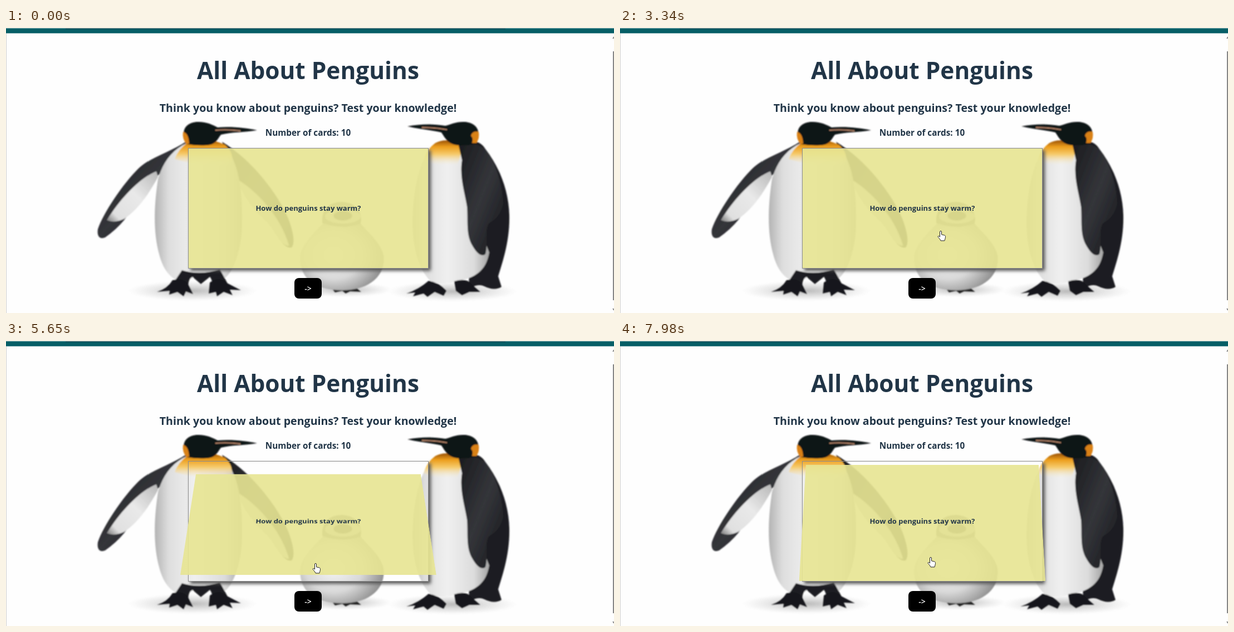
Animation, 1092 px wide and 513 px high, one loop 8000 ms. Source, as an HTML page:

```html
<!DOCTYPE html>
<html lang="en">
<head>
<meta charset="utf-8">
<title>Penguin cards</title>
<style>
  html, body { margin: 0; width: 100%; height: 100%; overflow: hidden; background: #fefefe; }
  body { position: relative; font: 700 13px/21px "Open Sans", "Noto Sans", sans-serif; color: #213547; }
  svg { position: absolute; left: 0; top: 0; overflow: visible; }
  text { fill: #213547; text-anchor: middle; }
  .card {
    position: absolute; left: 327px; top: 216px; width: 432px; height: 217px;
    box-sizing: border-box; border: 1px solid #8d8d8d;
    box-shadow: 4px 4px 6px #555; perspective: 900px;
  }
  .flip { position: absolute; inset: 0; transform-style: preserve-3d; }
  .face {
    position: absolute; inset: 0; display: flex; align-items: center; justify-content: center;
    text-align: center; white-space: nowrap; background: rgba(231, 229, 147, .91); backface-visibility: hidden;
  }
  .back { transform: rotateX(180deg); }
  .next {
    position: absolute; left: 518px; top: 450px; width: 49px; height: 37px; border-radius: 8px;
    background: #000; color: #fff; font-size: 14px; font-weight: 600; line-height: 38px; text-align: center;
  }
</style>
</head>
<body>
<svg width="1092" height="513" viewBox="0 0 1092 513">
  <defs>
    <linearGradient id="belly">
      <stop offset="0" stop-color="#b4b4b4"/><stop offset=".16" stop-color="#dedede"/>
      <stop offset=".45" stop-color="#f0f0f0"/><stop offset=".8" stop-color="#dcdcdc"/>
      <stop offset="1" stop-color="#a4a4a4"/>
    </linearGradient>
    <linearGradient id="bib" x2="0" y2="1">
      <stop offset="0" stop-color="#9a5205"/><stop offset=".25" stop-color="#ec9d1c"/>
      <stop offset=".55" stop-color="#f6cb6c"/><stop offset="1" stop-color="#f4f0e4" stop-opacity="0"/>
    </linearGradient>
    <linearGradient id="wing" x2="1" y2="1">
      <stop offset="0" stop-color="#1a1b1e"/><stop offset=".5" stop-color="#34353a"/>
      <stop offset="1" stop-color="#17181b"/>
    </linearGradient>
    <linearGradient id="under" x1="1" y1="0" x2="0" y2="1">
      <stop offset="0" stop-color="#b9b9b9"/><stop offset=".45" stop-color="#e9e9e9"/>
      <stop offset=".85" stop-color="#e0e0e0"/><stop offset="1" stop-color="#777"/>
    </linearGradient>
    <radialGradient id="chick" cx=".4" cy=".5" r=".62">
      <stop offset="0" stop-color="#f4f4f4"/><stop offset=".55" stop-color="#d9d9d9"/>
      <stop offset="1" stop-color="#8e8e8e"/>
    </radialGradient>
    <radialGradient id="ground">
      <stop offset="0" stop-color="#777" stop-opacity=".5"/><stop offset="1" stop-color="#999" stop-opacity="0"/>
    </radialGradient>
    <filter id="soft"><feGaussianBlur stdDeviation=".8"/></filter>
  </defs>

  <g filter="url(#soft)">
    <g fill="url(#ground)">
      <ellipse cx="335" cy="473" rx="115" ry="18"/>
      <ellipse cx="608" cy="471" rx="85" ry="13"/>
      <ellipse cx="802" cy="474" rx="115" ry="18"/>
    </g>

    <!-- left adult -->
    <path fill="url(#wing)" d="M388 205C430 230 474 278 500 328C514 355 521 386 513 395C500 398 489 377 477 358C455 326 425 300 410 262Z"/>
    <path fill="#cfcfcf" d="M414 272C445 290 492 335 508 392C491 390 484 366 469 350Q430 315 414 272Z"/>
    <path fill="url(#wing)" d="M324 204C298 222 262 232 241 250C210 279 174 335 165 362C163 374 168 381 178 377Q198 363 212 346L270 268L322 224Z"/>
    <path fill="url(#under)" d="M270 258C240 270 206 306 181 346Q196 352 213 343C240 324 258 296 273 268Z"/>
    <path fill="url(#belly)" d="M325 207C298 219 281 243 273 272C265 325 265 370 275 407C281 430 290 445 309 456Q330 457 342 445L363 445Q372 459 391 452C409 439 424 399 424 348C425 296 418 242 392 210Z"/>
    <path fill="url(#bib)" d="M325 207Q360 194 393 210Q411 226 404 247Q354 252 303 236Q309 219 325 207Z"/>
    <path fill="#111216" d="M326 209C314 191 317 172 342 169C359 168 371 174 380 179C407 177 431 180 451 184C429 188 405 187 386 192C379 201 377 210 360 211Q341 212 326 209Z"/>
    <path fill="#d98118" d="M318 187Q328 189 329 208L324 209Q316 199 318 187Z"/>
    <path fill="none" stroke="#b9876a" stroke-width="2" d="M376 184Q397 182 421 185"/>
    <path fill="#1b1c20" d="M316 436L300 460L328 468Q326 452 335 448L350 461L366 448Q372 454 370 467L398 460L384 434Q350 446 316 436Z"/>
    <path fill="#17181b" d="M299 454Q320 448 328 463L336 479L323 474L319 483L308 475L293 480L294 473L271 475Q290 469 299 454ZM366 458Q384 446 397 459L422 472L402 471L407 481L391 475L379 483L377 475L364 478Z"/>

    <!-- chick -->
    <path fill="#222" d="M583 466H627L638 475L618 474L610 478L604 473L591 476Z"/>
    <path fill="url(#chick)" d="M575 346C558 364 536 383 529 405C524 444 547 472 604 472C655 472 683 444 678 408C671 383 648 367 632 346Z"/>
    <path fill="#777" d="M568 351C566 325 582 313 604 313C629 314 641 332 637 352Q604 364 568 351Z"/>
    <ellipse cx="605" cy="339" rx="32" ry="13" fill="#c4c4c4"/>
    <ellipse cx="605" cy="338" rx="17" ry="9" fill="#3a3a3a"/>

    <!-- right adult -->
    <path fill="#1b1c20" d="M812 206Q849 196 861 218C887 251 903 294 904 337C905 385 891 423 884 447L890 466Q877 474 859 465Q849 460 833 468L819 330Z"/>
    <path fill="url(#belly)" d="M771 207C746 231 735 272 731 325C727 379 736 429 763 456Q782 464 809 456C842 450 862 438 868 404L846 350L828 250L813 207Z"/>
    <path fill="url(#bib)" d="M771 207Q790 197 814 208Q821 225 810 247Q777 251 750 238Q755 219 771 207Z"/>
    <path fill="url(#wing)" d="M812 207Q845 206 861 218C879 242 892 280 893 316C889 337 878 345 867 352C859 367 866 391 861 407C853 414 843 402 836 389C826 369 830 346 828 322C824 296 814 268 819 238Z"/>
    <path fill="#111216" d="M844 208C854 191 849 171 824 169C809 168 798 174 789 176C766 172 742 173 721 177C742 182 766 184 782 188C790 200 794 209 812 211Q829 212 844 208Z"/>
    <path fill="#d98118" d="M849 187Q838 184 835 194Q840 199 837 207L845 207Q851 198 849 187Z"/>
    <path fill="none" stroke="#b9876a" stroke-width="2" d="M747 179Q770 179 792 183"/>
    <path fill="#17181b" d="M759 455Q776 457 791 473L786 482L770 475L757 484L750 478L731 483L735 476L719 478Q742 470 759 455ZM805 456Q828 449 837 462L852 475L832 475L819 481L808 473Z"/>
  </g>

  <path fill="#065e66" d="M0 .5H1092V9.5H0Z"/>
  <path fill="#123f49" d="M107 1H897V2H107Z"/>
  <path fill="#d0d0d0" d="M0 10H1V513H0Z"/>
  <path fill="#858585" d="M1090 42H1092V490H1090ZM1089 19L1092 15V19ZM1089 505H1092V509Z"/>

  <text x="542.5" y="92" font-size="42.4">All About Penguins</text>
  <text x="542.5" y="151" font-size="19.6">Think you know about penguins? Test your knowledge!</text>
  <text x="542.5" y="194" font-size="15.3">Number of cards: 10</text>
</svg>

<div class="card">
  <div class="flip" id="flip">
    <div class="face">How do penguins stay warm?</div>
    <div class="face back">In addition to feathers, they have a gland near the base of their<br>tail to provide waterproof oil.</div>
  </div>
</div>
<div class="next">-&gt;</div>

<svg width="1092" height="513" viewBox="0 0 1092 513">
  <circle id="press" r="11" fill="#ece72c"/>
  <g id="pointer" fill="#fff" stroke="#222" stroke-linejoin="round">
    <path id="arrow" d="M.5 .5V15.5L4 12.3L6.3 17.5L8.7 16.5L6.5 11.4H11Z"/>
    <path id="hand" transform="translate(-5.5 0)" d="M4 11V1.9a1.5 1.5 0 0 1 3 0V6.8L12 8c1.5.4 2 1 2 2.6 0 2.7-.8 4.4-1.6 7.3H5.6C4.6 15.4 2 12.7 .8 11.2 0 9.9 1.5 8.7 2.6 9.8Z"/>
  </g>
</svg>

<script>
  const LOOP = 8000, FLIP = 400, PRESS = 70;
  const $ = id => document.getElementById(id);

  // Pointer tip: time, x, y
  const path = [
    [1190, 1036, 500], [1940, 892, 285], [2010, 892, 284], [2080, 891, 282], [2670, 891, 282],
    [3470, 552, 371], [3540, 552, 372], [4250, 552, 372], [4630, 552, 382], [4760, 552, 382],
    [4980, 556, 402], [5100, 556, 400], [5600, 556, 400], [6040, 558, 389], [LOOP, 558, 389]
  ];
  const clicks = [3840, 5430, 6640, 7695];
  const flips = [3852, 5445, 6655, 7715];

  const clamp = v => Math.min(1, Math.max(0, v));
  const smooth = v => v * v * (3 - 2 * v);

  // cubic-bezier(.25, .1, .25, 1)
  function ease(x) {
    let lo = 0, hi = 1;
    const bez = (a, b, u) => 3 * a * u * (1 - u) ** 2 + 3 * b * u * u * (1 - u) + u ** 3;
    for (let i = 0; i < 20; i++) {
      const mid = (lo + hi) / 2;
      if (bez(.25, .25, mid) < x) lo = mid; else hi = mid;
    }
    return bez(.1, 1, lo);
  }

  function tipAt(t) {
    const i = Math.max(1, path.findIndex(p => p[0] > t));
    const [t0, x0, y0] = path[i - 1], [t1, x1, y1] = path[i];
    const k = smooth(clamp((t - t0) / (t1 - t0)));
    return [x0 + (x1 - x0) * k, y0 + (y1 - y0) * k];
  }

  function angleAt(t) {
    return flips.reduce((sum, start, i) => {
      const turn = i % 2 ? -180 : 180;
      return t <= start ? sum : sum + turn * (t >= start + FLIP ? 1 : ease((t - start) / FLIP));
    }, 0);
  }

  const show = (el, on) => { el.style.visibility = on ? "visible" : "hidden"; };

  function draw(now) {
    const t = now % LOOP;
    const [x, y] = tipAt(t).map(Math.round);
    const seen = t >= path[0][0];
    const overCard = x < 759 && y < 433;
    const place = `translate(${x} ${y})`;
    $("pointer").setAttribute("transform", place);
    $("press").setAttribute("transform", place);
    show($("arrow"), seen && !overCard);
    show($("hand"), seen && overCard);
    show($("press"), clicks.some(c => t >= c && t < c + PRESS));
    $("flip").style.transform = `rotateX(${angleAt(t)}deg)`;
  }

  const start = performance.now();
  function tick() {
    draw(performance.now() - start);
    requestAnimationFrame(tick);
  }
  tick();
</script>
</body>
</html>
```
